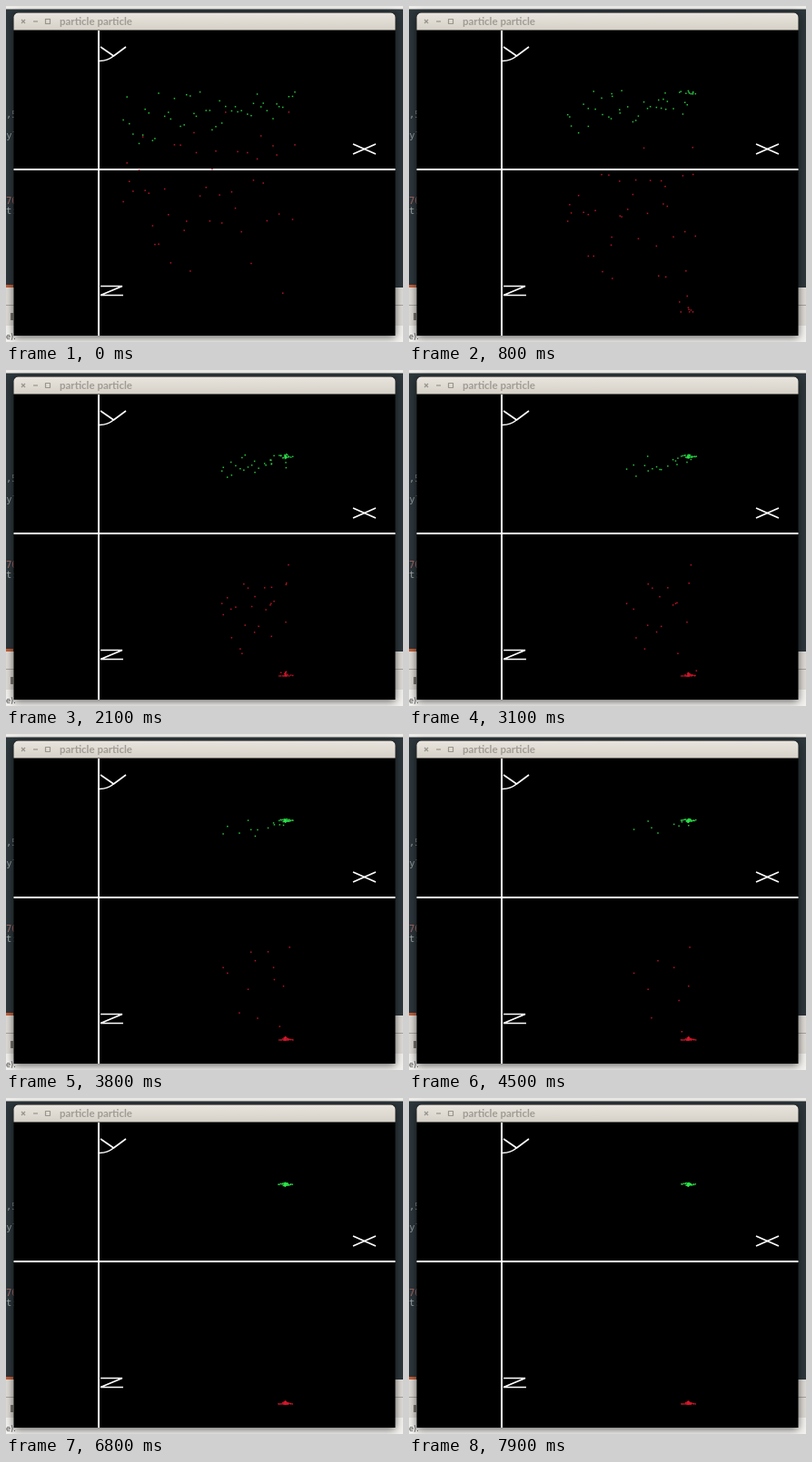
An HTML page with a canvas for the animation above (8 s loop, 437 by 370 pixels).

```html
<!DOCTYPE html>
<html lang="en">
<head>
<meta charset="utf-8">
<title>particle particle</title>
<style>
html, body { margin: 0; width: 437px; height: 370px; overflow: hidden; background: #263035; }
canvas { display: block; }
</style>
</head>
<body>
<canvas id="stage" width="437" height="370"></canvas>
<script>
const ctx = document.getElementById('stage').getContext('2d');
const LOOP = 8000, TICK = 100, COUNT = 47;
const GOAL = [307.5, 95, 337];
const DRIFT = [0.6, 0.6, 0.45]; // share of the way covered before the final hop

const clamp = v => Math.max(0, Math.min(1, v));
const fract = v => v - Math.floor(v);
const random = (i, k) => fract(Math.sin(i * 12.9898 + k * 78.233) * 43758.5453);

const particles = Array.from({ length: COUNT }, (_, i) => {
  const far = fract(i * 0.618034); // 0 right, 1 left
  const side = random(i, 1) * 2 - 1;
  const flat = 1 - side * side;
  return {
    start: [
      318 - 193 * far,
      94 + random(i, 2) * (28 + 36 * far),
      100 + 110 * (random(i, 3) + random(i, 4))
    ],
    rest: [side ** 3 * 8, (random(i, 5) * 4 - 2) * flat, -3 * random(i, 6) ** 2 * flat],
    arrive: 300 + 6700 * (1 - ((i + 0.5) / COUNT) ** (1 / 1.7)),
    phase: random(i, 7) * 6.28
  };
});

function place(p, t) {
  const left = clamp((p.arrive - t) / Math.min(500, p.arrive));
  const spread = 1 + Math.exp(-t / 2000);
  const sway = clamp(t / 500) * (0.3 + 1.7 * left);
  const wave = [Math.sin(t / 190 + p.phase), Math.cos(t / 240 + p.phase * 2), 0];
  return GOAL.map((goal, a) => {
    const end = goal + p.rest[a] * spread;
    const way = left * (1 - DRIFT[a] * clamp(t / 2000));
    return end + (p.start[a] - end) * way + wave[a] * sway;
  });
}

function box(color, x, y, w, h) {
  ctx.fillStyle = color;
  ctx.fillRect(x, y, w, h);
}

function line(width, color, ...points) {
  ctx.lineWidth = width;
  ctx.strokeStyle = color;
  ctx.beginPath();
  for (let i = 0; i < points.length; i += 2) ctx.lineTo(points[i], points[i + 1]);
  ctx.stroke();
}

function label(text, x, y, font, color) {
  ctx.font = font;
  ctx.fillStyle = color;
  ctx.fillText(text, x, y);
}

function drawDesktop() {
  box('#2c363b', 0, 0, 437, 370);
  box('#eeece8', 0, 0, 437, 3.5);
  box('#c05f3a', 0, 307, 8, 3);
  box('#dedbd6', 0, 310, 437, 60);
  box('#a8a5a0', 0, 329, 437, 1);
  box('#f3f2ef', 0, 352, 437, 18);
  const mono = '10.5px "DejaVu Sans Mono", monospace';
  label(',5', 0, 123, mono, '#8f9a9c');
  label('dyl', -6, 146, mono, '#8f9a9c');
  label('70', 0, 218, mono, '#a46b68');
  label('t:', 0, 229, mono, '#a4adae');
  box('#77746f', 5, 338, 3, 8);
  label('e):', 0, 367, '8px "DejaVu Sans", sans-serif', '#444');
}

function drawWindow() {
  ctx.save();
  ctx.shadowColor = 'rgba(0, 0, 0, 0.6)';
  ctx.shadowBlur = 10;
  ctx.shadowOffsetY = 2;
  ctx.fillStyle = '#000';
  ctx.beginPath();
  ctx.roundRect(8.5, 7, 420, 356, [5, 5, 0, 0]);
  ctx.fill();
  ctx.restore();

  const bar = ctx.createLinearGradient(0, 7, 0, 26);
  bar.addColorStop(0, '#e9e5de');
  bar.addColorStop(1, '#d6d1c8');
  ctx.fillStyle = bar;
  ctx.beginPath();
  ctx.roundRect(8.5, 7.5, 420, 19, [5, 5, 0, 0]);
  ctx.fill();
  const gray = '#99958d';
  line(1.2, gray, 17, 15, 21, 19);
  line(1.2, gray, 21, 15, 17, 19);
  line(1.2, gray, 30, 17, 35, 17);
  ctx.strokeRect(43.5, 14.5, 5, 5);
  label('particle particle', 59, 21, 'bold 11.5px Lato, sans-serif', '#a09c95');

  box('#fff', 101, 27, 2, 336);
  box('#fff', 8.5, 179, 420, 2);
  ctx.lineJoin = 'bevel';
  line(1.6, '#fff', 104, 45, 118.5, 55);
  ctx.beginPath();
  ctx.moveTo(132, 45);
  ctx.lineTo(118.5, 55);
  ctx.quadraticCurveTo(111, 61, 102, 60.5);
  ctx.stroke();
  line(1.6, '#fff', 382, 152, 407, 163);
  line(1.6, '#fff', 407, 152, 382, 163);
  line(1.6, '#fff', 104, 308.5, 128, 308.5, 104, 318.5, 129, 318.5);
}

function frame(now) {
  const t = Math.floor(now % LOOP / TICK) * TICK;
  drawDesktop();
  drawWindow();
  for (const p of particles) {
    const [x, y, z] = place(p, t);
    box('rgba(215, 25, 45, 0.85)', x - 0.75, z - 0.75, 1.5, 1.5);
    box('rgba(45, 230, 75, 0.85)', x - 0.75, y - 0.75, 1.5, 1.5);
  }
  requestAnimationFrame(frame);
}
requestAnimationFrame(frame);
</script>
</body>
</html>
```
